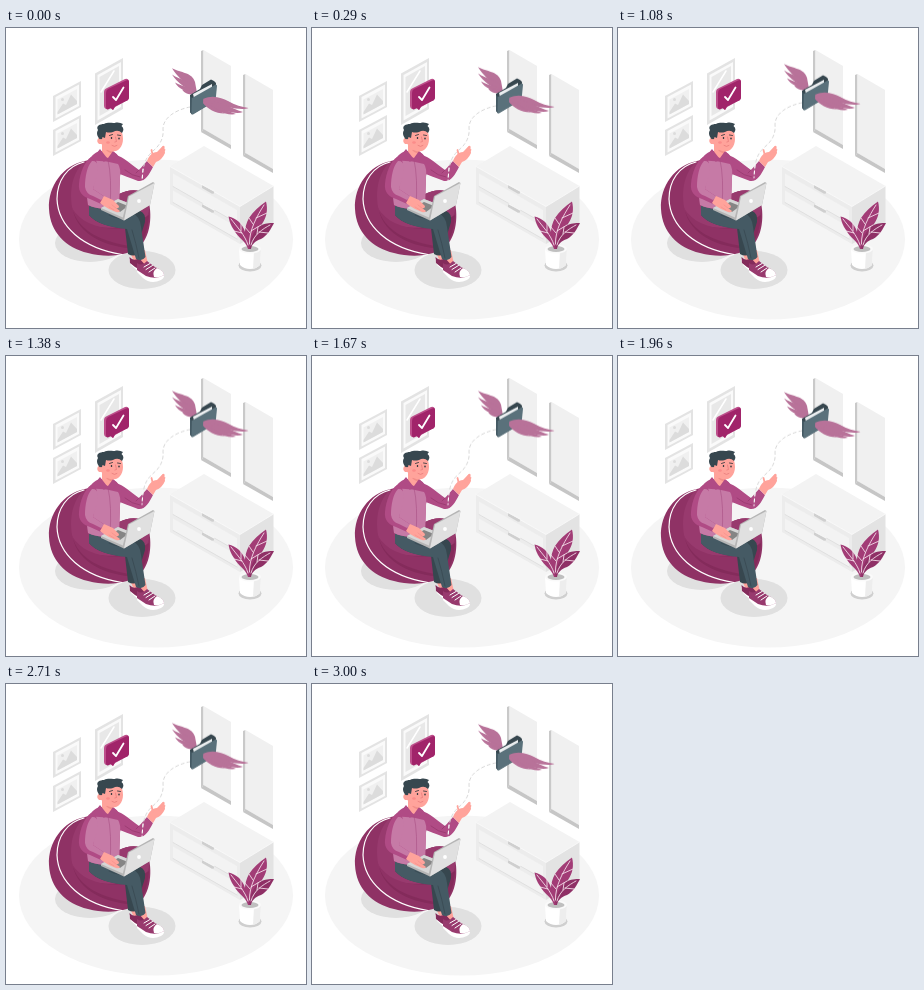
These frames come from a looping animation (300 px wide and 300 px high, 3040 ms). An HTML page:

```html
<!DOCTYPE html>
<html lang="en">
<head>
<meta charset="utf-8">
<title>Flying folder</title>
<style>
  html, body { margin: 0; width: 100%; height: 100%; overflow: hidden; background: #fff; }
  svg { display: block; width: 100%; height: 100%; }
  path, ellipse, circle { stroke-linecap: round; stroke-linejoin: round; }
  .float { animation: float 3040ms linear infinite; }
  @keyframes float { 50% { transform: translateY(-6px); } }
  .line { fill: none; }
</style>
</head>
<body>
<svg viewBox="0 0 300 300">
  <defs>
    <g id="picture">
      <path fill="#e3e3e3" d="M0 15 28 0V26L0 41Z"/>
      <path fill="#fafafa" d="M2.500 16 26 3.500V25L2.500 37.500Z"/>
      <path fill="#f0f0f0" d="M4.500 18.500 24 8V23L4.500 33.500Z"/>
      <path fill="#dcdcdc" d="M4.500 33.500V31L10 22.500 13 24 18 13.500 24 20V23Z"/>
      <circle cx="9.500" cy="18.500" r="1.500" fill="#dcdcdc"/>
    </g>
    <g id="handle">
      <path fill="#cfcfcf" d="M0 0 12 6.500V8.500L10 8.700 0 3Z"/>
      <path fill="#f5f5f5" d="M0 0 1.500-.8 13 5.500 12 6.500Z"/>
    </g>
    <g id="window">
      <path fill="#c9c9c9" d="M0 0 2.500-1V78L0 81Z"/>
      <path fill="#f0f0f0" d="M2.500-1 30 15V94L2.500 78Z"/>
      <path fill="#c6c6c6" d="M0 81 2.500 78 30 94V98Z"/>
    </g>
  </defs>

  <ellipse cx="150" cy="211.500" rx="137" ry="80" fill="#f5f5f5"/>

  <!-- Wall -->
  <use href="#picture" x="47" y="53"/>
  <use href="#picture" x="47" y="87"/>
  <path fill="#e3e3e3" d="M89 45.500 117 30V81L89 97Z"/>
  <path fill="#fafafa" d="M91.500 47 115 34V79L91.500 92.500Z"/>
  <path fill="#e8e8e8" d="M93.500 49 113 38V77L93.500 88Z"/>
  <path class="line" stroke="#fff" stroke-width="1.500" d="M95 64 108 43"/>
  <use href="#window" x="195" y="23"/>
  <use href="#window" x="237" y="47"/>

  <!-- Cabinet -->
  <path fill="#f3f3f3" d="M164 138.500 198 118 267.500 158 234 178.500Z"/>
  <path fill="#ececec" d="M164 138.500 234 178.500V216L164 176Z"/>
  <path fill="#e3e3e3" d="M234 178.500 267.500 158V197L234 216Z"/>
  <path fill="#f3f3f3" d="M167 145.500 231 182V195L167 158.500ZM167 162.500 231 199V211L167 174.500Z"/>
  <path class="line" stroke="#dedede" stroke-width=".9" d="M167 158.500 231 195M167 174.500 231 211"/>
  <path class="line" stroke="#fafafa" stroke-width=".8" d="M164 138.500 234 178.500 267.500 158"/>
  <use href="#handle" x="196" y="157"/>
  <use href="#handle" x="196" y="176"/>

  <!-- Plant -->
  <ellipse cx="244" cy="237.500" rx="11.500" ry="6" fill="#cfcfcf"/>
  <path fill="#fff" d="M233 221H255L254 237Q250 241 244 241T234 237Z"/>
  <path fill="#ededed" d="M248 223 255 221 254 237Q251 240 247 241Z"/>
  <ellipse cx="244" cy="221" rx="11" ry="4.500" fill="#fafafa"/>
  <ellipse cx="244" cy="221" rx="8.500" ry="3" fill="#bfbfbf"/>
  <path fill="#a23c76" d="M243 221C237 211 238 199 243 190 247 184 253 178 260 173.500 262 181 261 189 256 196 249 204 245 210 244.500 221Z"/>
  <path fill="#a23c76" d="M242 221C240 213 232 210 228 202Q224 197 222.500 188.500C230 190 237 196 239 204 241 210 244 214 243.500 221Z"/>
  <path fill="#8f3066" d="M243.500 221C243 211 248 203 254 198 259 195 263 195 268 195 265 201 261 208 255 211 249 213 246 216 245 221Z"/>
  <path class="line" stroke="#f7e5ef" stroke-width=".85" d="M243.500 216C243 202 251 188 258 177M244 205 238 198M247 196 243 190M245 203 255 197M250 190 261 185M242 217C239 207 231 199 225 191M236 205 228 203M235 203 235 195M245 217C248 206 257 201 264 197M251 206 252 199M253 204 262 205"/>

  <!-- Ground shadows -->
  <ellipse cx="84" cy="215" rx="35" ry="19" fill="#e0e0e0"/>
  <ellipse cx="136" cy="242" rx="33.500" ry="19" fill="#e0e0e0"/>

  <!-- Bean bag: high back on the left, low seat on the right -->
  <path fill="#8f3265" d="M79 133C57 137 42 158 43 181 44 204 60 220 82 225 101 230 123 228 134 218 146 207 147 180 140 167 132 160 122 162 113 166L104 138C96 133 87 131 79 133Z"/>
  <path fill="#983a6e" d="M79 133C67 143 62 163 67 183 76 200 108 207 138 192 145 187 144 173 140 167 132 160 122 162 113 166L104 138C96 133 87 131 79 133Z"/>
  <path fill="#842b5b" d="M67 183C77 202 112 207 143 187 142 202 138 214 130 221 99 219 73 207 67 183Z"/>
  <path fill="#8f3265" d="M66 180C76 197 99 204 127 199L125 218C96 214 72 203 66 180Z"/>
  <path class="line" stroke="#fff" stroke-width="1.200" d="M78 134C61 138 51 153 51 171 52 198 76 220 116 226.500"/>

  <!-- Shoes and legs -->
  <path fill="#ffa39b" d="M123 222 132 219 136 232 129 236ZM130 224 139 222 142 236 135 239Z"/>
  <g id="shoes">
    <path fill="#fff" d="M123 231 129 232 140 240 143 244Q140 248 134 245L125 237Z"/>
    <path fill="#842b5b" d="M123.500 229Q128 234 133 230L141 239 140 243Q133 243 124 235Z"/>
    <path fill="#fff" d="M131 239 136 244Q144 250 157 245 160 249 155 252 145 257 137 250L131 244Z"/>
    <path fill="#983a6e" d="M131 235Q136 239 141 233L149 239Q158 243 158 247 150 252 140 248L131 242Z"/>
    <path fill="#fff" d="M151 240Q158 243 158 247 154 250 148 249 146 243 151 240Z"/>
    <path class="line" stroke="#fff" stroke-width="1" d="M138 239 144 235.500M140 241.500 146.500 237.500M143 244 149 240"/>
  </g>
  <path fill="#37474f" d="M83 174C90 173 103 177 111 179L134 183Q140 185 139 194L135 207 133 226Q127 229 122 226L119 200C106 200 89 195 83 187Z"/>
  <path fill="#455a64" d="M83 176C92 180 105 186 115 186L126 185Q134 188 135 199L139.500 229Q136 234 130 231L121 201C106 200 89 195 83 187Z"/>
  <path class="line" stroke="#37474f" stroke-width=".7" d="M103 187Q113 192 122 190M126 202Q130 215 133 230"/>

  <!-- Far arm -->
  <path fill="#b04b85" d="M110 127C117 129 125 136 133 142L141 133 147 139C143 147 139 154 132 153 124 150 117 147 111 145Z"/>
  <path class="line" stroke="#96376c" stroke-width=".7" d="M133 142 130 145M119 142Q126 148 134 149"/>
  <path fill="#ffa39b" d="M141 133C143 128 146 124 151 124L157 118Q159 117 158.500 121L159 125Q156 132 150 134L147 139Z"/>
  <path class="line" stroke="#ffa39b" stroke-width="1.800" d="M147 128 145.500 122M151 126 157 119M153 128 158.500 122"/>

  <!-- Torso -->
  <path fill="#b04b85" d="M94 123C83 126 78 140 79 150L82 177Q97 184 113 178L114 148C117 139 116 129 108 124Z"/>
  <path fill="#c67aa6" d="M84 133Q98 132 112 136Q115 140 114 150L113 178Q97 184 82 177L79 152Z"/>
  <path fill="#ffa39b" d="M96 117H108L107 128Q102 133 96 126Z"/>
  <path fill="#f28f89" d="M100 122 107 121 107 125Q103 126 100 122Z"/>
  <path fill="#b04b85" d="M94 121 101 130 98 134 90 126ZM107 123 111 127 106 134 102 130Z"/>
  <path class="line" stroke="#a64b80" stroke-width=".55" d="M102 132Q106 149 104 179"/>

  <!-- Head -->
  <path fill="#ffa39b" d="M94 106C94 100 99 97 106 97 114 97 117 104 117 111 117 119 112 123.500 107 123.500 101 123 97 119 95.500 116 91 117 89.500 111 94 109Z"/>
  <path fill="#37474f" d="M95.500 113C91 109 90 105 92 102 89.500 98 94 96 98 96 103 93.500 107 96 110 94.500Q114 94 117 96L115.500 98Q119 101 116 105 112 101 107 104 103 105 100 104L99 110 96.500 109Z"/>
  <circle cx="95" cy="113.500" r="2.500" fill="#ffa39b"/>
  <g fill="#263238">
    <ellipse cx="105.500" cy="110" rx=".75" ry="1.100"/>
    <ellipse cx="113" cy="110.500" rx=".75" ry="1.100"/>
  </g>
  <path class="line" stroke="#263238" stroke-width=".8" d="M103.500 107.500 106.500 106.500M111.500 107 114.500 107.500"/>
  <path class="line" stroke="#e57777" stroke-width=".7" d="M109.500 109 110.500 113.500 108.800 114M106 117.500Q108.500 119.500 111 117.500"/>
  <ellipse cx="102" cy="114.500" rx="1.800" ry="1.200" fill="#fb8c8a"/>

  <!-- Laptop -->
  <path fill="#b5b5b5" d="M95 180 112 171 130 178 118 190V192.500L95 182Z"/>
  <path fill="#d6d6d6" d="M95 180 112 171 130 178 118 190Z"/>
  <path fill="#858585" d="M103 179 112 174 122 178 114 184Z"/>

  <!-- Near arm -->
  <path fill="#b04b85" d="M85 129C79 133 74 144 73 156 72 164 77 169 84 171L95 176 99 169 87 161 89 148C92 138 92 129 85 129Z"/>
  <path fill="#c67aa6" d="M86 133C81 138 79 149 79 159Q80 166 87 168L95 172 99 169 87 161 91 147C93 139 92 132 86 133Z"/>
  <path fill="#ffa39b" d="M94 175 98 168 107 172 113 178Q113 181 110 180L114 183Q113 185 110 184L103 181 98 178Z"/>
  <path class="line" stroke="#f28f89" stroke-width=".6" d="M106 177 110 180M103 179 108 182"/>

  <path fill="#b5b5b5" d="M122 168 147 154 148.500 155 144 177 118 192.500 116.500 191Z"/>
  <path fill="#e0e0e0" d="M123 168.500 148.500 155 144 177 118 192.500Z"/>
  <circle cx="133" cy="173" r="1.900" fill="#fff"/>

  <!-- Check bubble -->
  <path fill="#bd4f8b" d="M98 64Q98 61 101 60L119 51Q122 50 123 53V69Q123 72 120 73L109 79 107 82 104 80 100 81Q98 80 98 78Z"/>
  <path fill="#a1246a" d="M100 65Q100 62 102 61L120 52.500Q123 51 123 54V69Q123 72 120 73L109 78.500 107 82 105 80 102 81.500Q100 82 100 79Z"/>
  <path class="line" stroke="#fff" stroke-width="1.800" d="M107 69 110 72 117.500 59.500"/>

  <!-- Flight trail and winged folder -->
  <g class="float">
    <path class="line" stroke="#d6d6d6" stroke-width="1" stroke-dasharray="3 3" d="M184 79C169 82 157 90 157 101 158 111 153 118 147 123 139 130 137 137 136 153"/>
    <path class="line" stroke="#fff" stroke-width="1" stroke-dasharray="3 3" d="M137 141 136 154"/>
    <g fill="#b87299">
      <path d="M191 65C187 58 178 58 166 40.200 175 45 186 44 189 54Z"/>
      <path d="M190 65C182 62 171 55 166 46.500 174 52 186 53 190 62Z"/>
      <path d="M190 66C183 65 172 61 169 54.500 177 59 186 59 190 64Z"/>
      <path d="M190 66.500C184 67 179 66 176 61.500 182 63 187 63 190 65Z"/>
    </g>
    <path fill="#37474f" d="M184 67 194 61 196 57 205 51.500 208 53 210 55 209 73 186 86.500 184 84Z"/>
    <path fill="#eceff1" d="M187 66 206 56V60L188 70Z"/>
    <path fill="#455a64" d="M184 68 186 70V86.500L184 84Z"/>
    <path fill="#5a717b" d="M186 70 209 57Q211 56 211 58L209.500 73 187 86.500Q185.500 87 185.500 84Z"/>
    <g fill="#b87299">
      <path d="M197 71C207 66 216 70 222 73 229 77 236 79 242.500 80 235 83 222 79 198 73Z"/>
      <path d="M197 72C211 71 224 80 237 84 229 87 216 82 198 75Z"/>
      <path d="M197 73C209 74 217 82 230 86 221 88 208 82 198 76Z"/>
      <path d="M197 74C206 77 212 83 219 85.500 211 86 201 81 197 75Z"/>
    </g>
  </g>
</svg>
</body>
</html>
```
